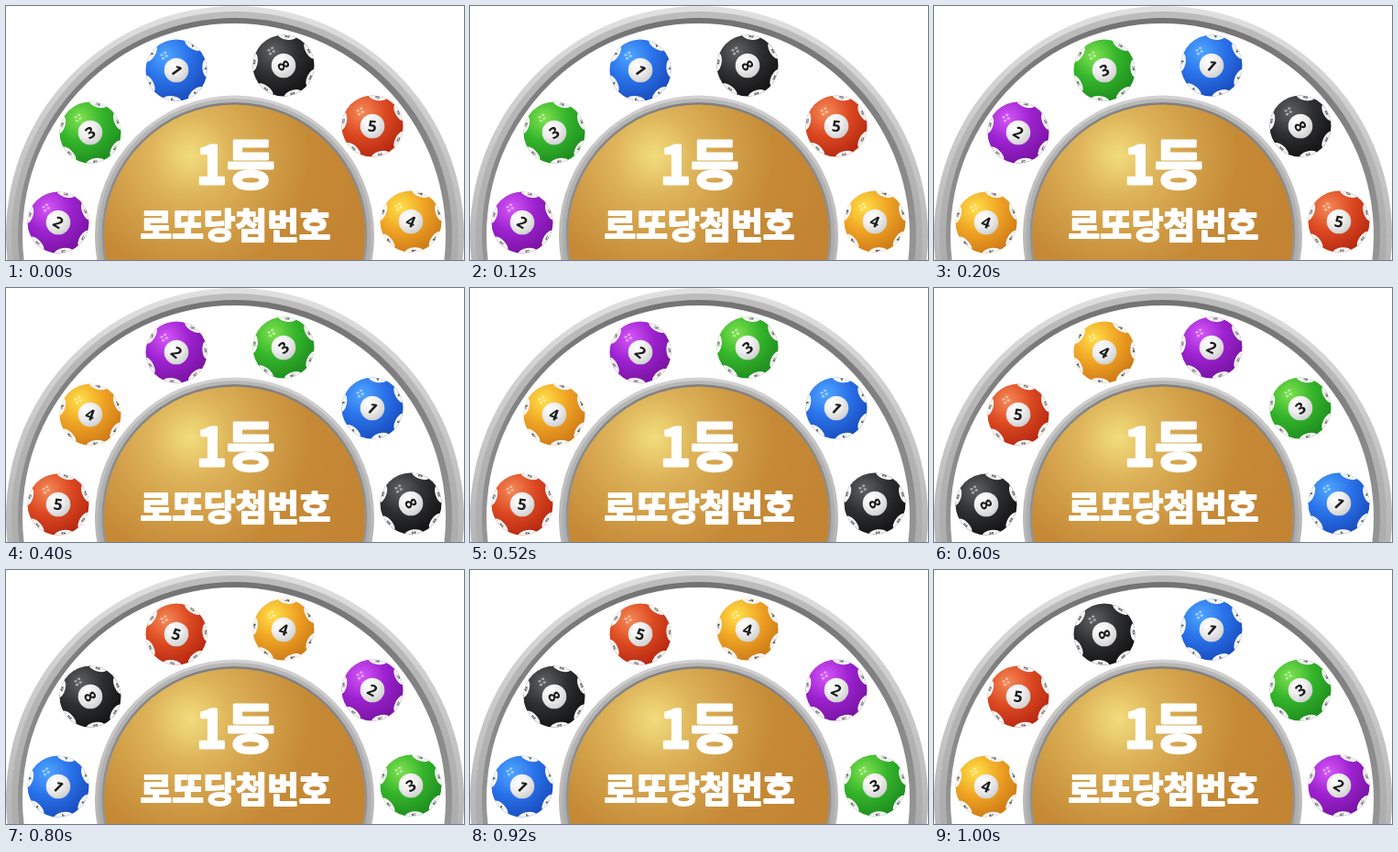
An HTML page that plays this animation: 500x277 px, repeating every 1.2 s.

```html
<!DOCTYPE html>
<html lang="ko">
<head>
<meta charset="utf-8">
<style>
html, body { margin: 0; width: 100%; height: 100%; overflow: hidden; background: #fff; }
svg { display: block; width: 100vw; height: 100vh; }
text { font-family: "Noto Sans CJK KR", "Noto Sans CJK", "Noto Sans CJK JP", sans-serif; font-weight: 700; text-anchor: middle; }
.title { fill: #fff; stroke: #fff; stroke-linejoin: round; }
.digit, .mini { font-family: "Open Sans", "Noto Sans", sans-serif; fill: #1c1c1c; }
.mini { fill: #555; }
</style>
</head>
<body>
<svg viewBox="0 0 500 277" preserveAspectRatio="none">
  <defs id="defs">
    <radialGradient id="gold" gradientUnits="userSpaceOnUse" cx="201" cy="163" r="200">
      <stop offset="0" stop-color="#f1dc7e"/>
      <stop offset=".1" stop-color="#e9cb6c"/>
      <stop offset=".22" stop-color="#deb45a"/>
      <stop offset=".42" stop-color="#d29f49"/>
      <stop offset=".65" stop-color="#c68a37"/>
      <stop offset="1" stop-color="#c28432"/>
    </radialGradient>
    <linearGradient id="edge" gradientUnits="userSpaceOnUse" x1="0" x2="0" y1="0" y2="277">
      <stop offset="0" stop-color="#e0e0e0"/>
      <stop offset="1" stop-color="#b6b6b7"/>
    </linearGradient>
    <linearGradient id="face" gradientUnits="userSpaceOnUse" x1="0" x2="0" y1="0" y2="277">
      <stop offset="0" stop-color="#bdbdbe"/>
      <stop offset="1" stop-color="#adadae"/>
    </linearGradient>
    <linearGradient id="side" gradientUnits="userSpaceOnUse" x1="0" x2="0" y1="0" y2="277">
      <stop offset="0" stop-color="#717172"/>
      <stop offset="1" stop-color="#969697"/>
    </linearGradient>
    <radialGradient id="plate" cx=".35" cy=".3" r=".75">
      <stop offset="0" stop-color="#fff"/>
      <stop offset=".5" stop-color="#eee"/>
      <stop offset="1" stop-color="#cfcfcf"/>
    </radialGradient>
    <clipPath id="round"><circle r="33.5"/></clipPath>
  </defs>
  <g id="arches"></g>
  <text class="title" x="250.5" y="194" font-size="57" stroke-width="2.8">1등</text>
  <text class="title" x="250.5" y="252.5" font-size="37.7" stroke-width="1.9">로또당첨번호</text>
  <g id="balls"></g>
</svg>
<script>
const STEP = 200;
const SLOTS = [[57, 236], [92, 138], [186, 70], [303, 65], [400, 131], [442, 235]];
const ORDERS = ["231854", "423185", "542318", "854231", "185423", "458132"];
// light, base and dark tone, then the digit's tilt
const BALLS = {
  1: ["#4fa6ff", "#2a72ea", "#1a4fc0", 45],
  2: ["#d557f7", "#9d22d0", "#7a14a4", 30],
  3: ["#7fe250", "#35b52b", "#1f8f20", -30],
  4: ["#ffe04a", "#f0a524", "#d07c18", 20],
  5: ["#f58a58", "#dd4a22", "#b82a12", 8],
  8: ["#606163", "#2e2f31", "#151516", 62]
};
const SLOT_TURN = [0, 0, 18, -8, -5, 4];
const RIM = [-75, -22, 32, 80, 135, 195];

const el = (tag, attrs, parent, label) => {
  const node = document.createElementNS("http://www.w3.org/2000/svg", tag);
  for (const key in attrs) node.setAttribute(key, attrs[key]);
  if (label) node.textContent = label;
  parent.append(node);
  return node;
};
const byId = id => document.getElementById(id);

function disc(cx, r, fill) {
  el("circle", { cx, cy: 250, r, fill }, byId("arches"));
}

disc(250, 250, "url(#edge)");
disc(250, 244, "url(#face)");
disc(250, 237, "url(#side)");
disc(249, 231, "#fff");
disc(249.5, 152.5, "url(#edge)");
disc(249.5, 149, "url(#face)");
disc(249.5, 145, "url(#side)");
disc(249.5, 142.5, "url(#gold)");

function makeBall(n) {
  const [light, base, dark, tilt] = BALLS[n];
  const shade = el("radialGradient", { id: "shade" + n, cx: .33, cy: .27, r: .75 }, byId("defs"));
  [[0, light], [.5, base], [1, dark]].forEach(([offset, color]) =>
    el("stop", { offset, "stop-color": color }, shade));
  const ball = el("g", {}, byId("balls"));
  el("circle", { r: 33.5, fill: `url(#shade${n})` }, ball);
  const clip = el("g", { "clip-path": "url(#round)" }, ball);
  const rim = el("g", {}, clip);
  for (const angle of RIM) {
    const patch = el("g", { transform: `rotate(${angle}) translate(33 0)` }, rim);
    el("ellipse", { rx: 4.5, ry: 10, fill: "#f6f6f6" }, patch);
    el("text", { class: "mini", "font-size": 11, y: 4, transform: "translate(-1 0) scale(.3 1) rotate(90)" }, patch, n);
  }
  for (const [x, y] of [[-15, -20], [-11, -22], [-14, -16], [-10, -18]])
    el("rect", { x, y, width: 3, height: 2.4, rx: .7, fill: "#fff", opacity: .5, transform: "rotate(-8)" }, ball);
  el("circle", { r: 13.3, fill: "url(#plate)" }, ball);
  const digit = el("text", { class: "digit", "font-size": 17, y: 6.1 }, ball, n);
  return { ball, rim, digit, tilt };
}

const balls = {};
for (const n in BALLS) balls[n] = makeBall(n);

function draw(time) {
  const order = ORDERS[Math.floor(time / STEP) % ORDERS.length];
  SLOTS.forEach(([x, y], i) => {
    const { ball, rim, digit, tilt } = balls[order[i]];
    ball.setAttribute("transform", `translate(${x} ${y})`);
    rim.setAttribute("transform", `rotate(${SLOT_TURN[i]})`);
    digit.setAttribute("transform", `rotate(${tilt + SLOT_TURN[i] / 2})`);
  });
}

const start = performance.now();
function tick() {
  draw(performance.now() - start);
  requestAnimationFrame(tick);
}
tick();
</script>
</body>
</html>
```
